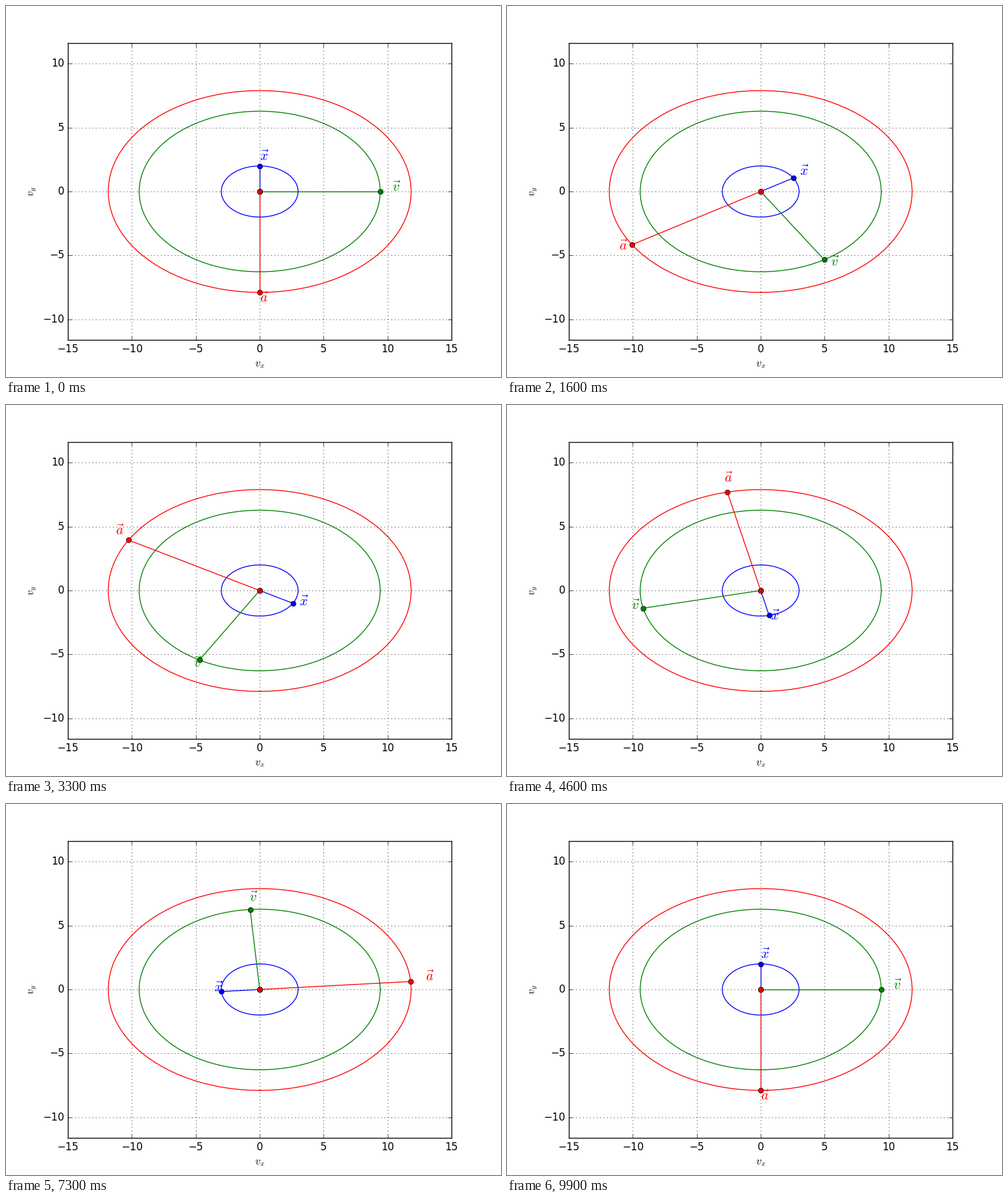
These frames come from a looping animation (800x600 px, 10 s). A matplotlib script:

```python
import matplotlib.pyplot as plt
import numpy as np
from matplotlib.animation import FuncAnimation

plt.style.use("classic")
plt.rcParams.update({"figure.dpi": 100, "savefig.dpi": 100,
                     "figure.facecolor": "white",
                     "font.family": "DejaVu Sans"})

FRAMES = 100
OMEGA = np.pi
A, B = 3.0, 2.0
ACC_SCALE = 0.4
phase = np.linspace(0, 2 * np.pi, FRAMES)


def position(p):
    return A * np.sin(p), B * np.cos(p)


def velocity(p):
    return A * OMEGA * np.cos(p), -B * OMEGA * np.sin(p)


def acceleration(p):
    k = -ACC_SCALE * OMEGA ** 2
    return k * A * np.sin(p), k * B * np.cos(p)


fig, ax = plt.subplots(figsize=(8, 6))
half_width = 15
half_height = half_width * 480 / 620  # equal scale on both axes
ax.set_xlim(-half_width, half_width)
ax.set_ylim(-half_height, half_height)
ax.set_xticks(range(-15, 16, 5))
ax.set_yticks(range(-10, 11, 5))
ax.set_xlabel("$v_x$")
ax.set_ylabel("$v_y$")
ax.grid(True)

# curve, colour, label, label distance relative to the vector
vectors = [
    (position, "b", r"$\vec{x}$", 1.2),
    (velocity, "g", r"$\vec{v}$", 1.1),
    (acceleration, "r", r"$\vec{a}$", 1.1),
]

for curve, color, _, _ in vectors:
    ax.plot(*curve(phase), color=color)

arms = []
for curve, color, name, reach in vectors:
    arm, = ax.plot([], [], "o-", color=color)
    label = ax.text(0, 0, name, color=color, fontsize=16)
    arms.append((curve, arm, label, reach))


def update(i):
    artists = []
    for curve, arm, label, reach in arms:
        x, y = curve(phase[i])
        arm.set_data([0, x], [0, y])
        label.set_position((reach * x, reach * y))
        artists += [arm, label]
    return artists


anim = FuncAnimation(fig, update, frames=FRAMES, interval=100,
                     init_func=lambda: update(0), repeat=True, repeat_delay=0)
plt.show()
```
